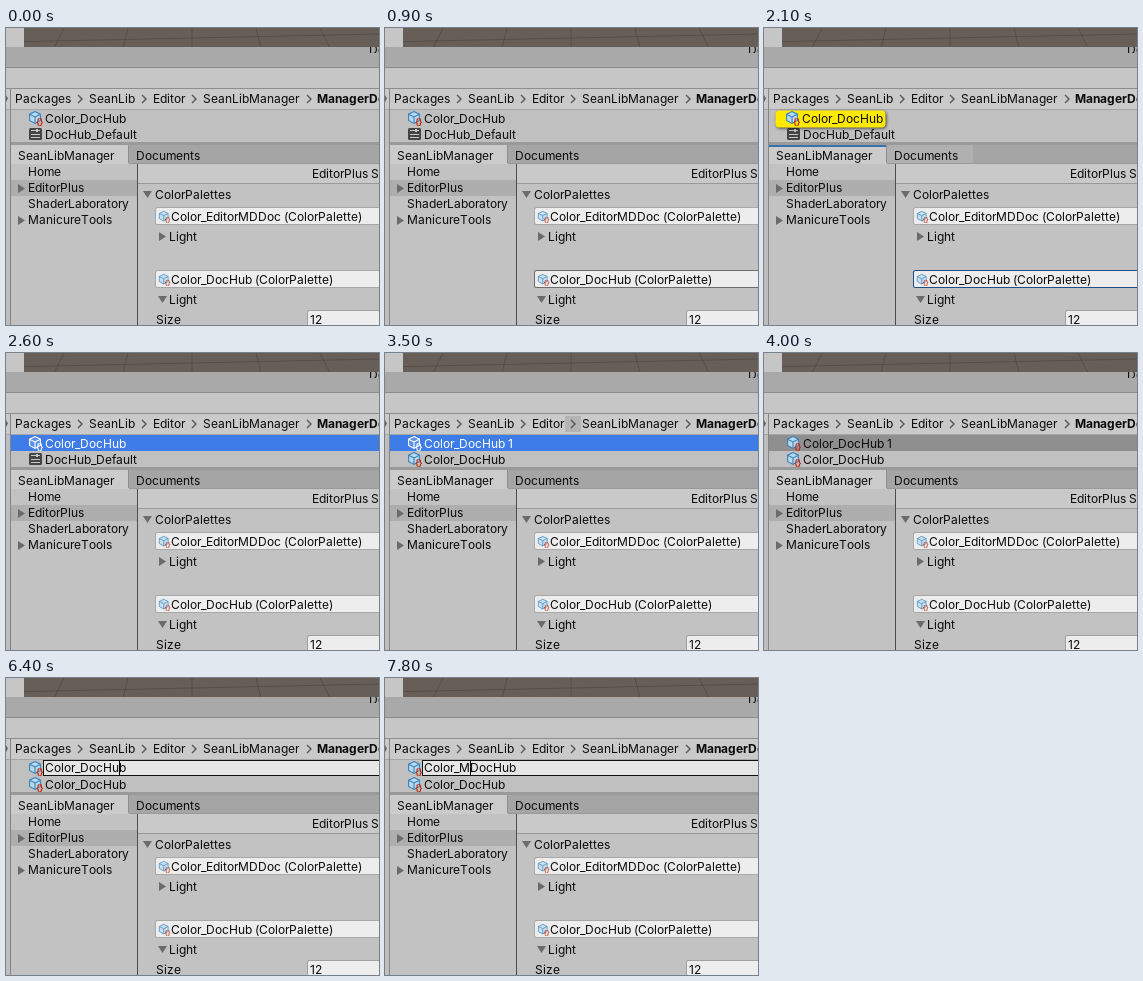
An HTML page with a canvas that plays this animation: 373x297 px, repeating every 8 s.

```html
<!DOCTYPE html>
<html lang="en">
<head>
<meta charset="utf-8">
<title>Duplicating a palette asset</title>
<style>
html, body { margin: 0; width: 373px; height: 297px; overflow: hidden; background: #c2c2c2; }
canvas { display: block; }
</style>
</head>
<body>
<canvas id="stage" width="373" height="297"></canvas>
<script>
const W = 373, H = 297, LOOP = 8000;
const ctx = document.getElementById('stage').getContext('2d');
const INK = '#0b0b0b', BLUE = '#3e7de7', PANEL = '#c2c2c2';

function rect(x, y, w, h, color) {
  ctx.fillStyle = color;
  ctx.fillRect(x, y, w, h);
}

function roundBox(x, y, w, h, r, color) {
  ctx.beginPath();
  ctx.roundRect(x, y, w, h, r);
  ctx.fillStyle = color;
  ctx.fill();
}

function setFont(weight) {
  ctx.font = weight + ' 12px Inter, Roboto, sans-serif';
}

// The editor lays glyphs out on whole pixels, halves going down.
const advance = ch => Math.round(ctx.measureText(ch).width - 0.06);

function widthOf(str) {
  setFont(400);
  return [...str].reduce((sum, ch) => sum + advance(ch), 0);
}

function text(str, x, y, color = INK, weight = 400) {
  setFont(weight);
  ctx.fillStyle = color;
  for (const ch of str) {
    ctx.fillText(ch, x, y);
    x += advance(ch);
  }
}

function path(points, close) {
  ctx.beginPath();
  points.forEach(([x, y], i) => i ? ctx.lineTo(x, y) : ctx.moveTo(x, y));
  if (close) ctx.closePath();
}

function arrow(x, y, open) {
  path(open ? [[x, y], [x + 9, y], [x + 4.5, y + 7]] : [[x, y], [x + 7, y + 4.5], [x, y + 9]], true);
  ctx.fillStyle = '#6b6b6b';
  ctx.fill();
}

// Cube with braces; (x, y) is the top left of a 16 px cell.
function cube(x, y, size = 1, white = false) {
  ctx.save();
  ctx.translate(x, y);
  ctx.scale(size, size);
  path([[7, 1.6], [12.4, 4.2], [12.4, 10.4], [7, 13.4], [1.6, 10.4], [1.6, 4.2]], true);
  ctx.fillStyle = white ? 'rgba(255,255,255,.15)' : '#b9d9ee';
  ctx.fill();
  ctx.lineWidth = 1.1;
  ctx.strokeStyle = white ? '#fff' : '#3a83bb';
  ctx.stroke();
  path([[1.6, 4.2], [7, 7], [12.4, 4.2]]);
  ctx.stroke();
  path([[7, 7], [7, 13.4]]);
  ctx.stroke();
  ctx.font = 'bold 8.5px Inter, Roboto, sans-serif';
  ctx.fillStyle = white ? '#fff' : '#c5290f';
  ctx.fillText('{', 8, 14.6);
  ctx.fillText('}', 11.6, 14.6);
  ctx.restore();
}

function presetIcon(x, y, white) {
  const dark = white ? '#fff' : '#444', light = white ? BLUE : '#c8c8c8';
  roundBox(x + 1, y + 2, 13, 12, 1.5, dark);
  for (const row of [4, 8, 11]) rect(x + 3, y + row, 9, 1, light);
  rect(x + 8, y + 3, 2, 3, light);
}

function chevron(x, y) {
  path([[x, y], [x + 4, y + 4], [x, y + 8]]);
  ctx.strokeStyle = '#555';
  ctx.lineWidth = 1.4;
  ctx.stroke();
}

function sceneStrip() {
  ctx.save();
  ctx.beginPath();
  ctx.rect(0, 0, W, 19);
  ctx.clip();
  rect(0, 0, W, 19, '#685e58');
  ctx.strokeStyle = 'rgba(45,40,38,.3)';
  ctx.lineWidth = 1;
  for (let i = -3; i < 4; i++) {
    const x = 186 + i * 64;
    path([[x, 0], [x + i * 5, 20]]);
    ctx.stroke();
  }
  path([[0, 14], [W, 6]]);
  ctx.stroke();
  rect(0, 0, 18, 19, '#c6c6c6');
  ctx.restore();
}

function topBars() {
  rect(0, 19, W, 20, '#a9a9a9');
  ctx.save();
  ctx.beginPath();
  ctx.rect(0, 19, W, 6);
  ctx.clip();
  text('Do', 363, 26);
  ctx.restore();
  rect(0, 39, W, 1, '#8c8c8c');
  rect(0, 40, W, 20, '#c6c6c6');
  rect(0, 60, W, 1, '#8e8e8e');
}

function crumbs(hover) {
  rect(5, 61, W, 20, '#cacaca');
  rect(5, 81, W, 1, '#a6a6a6');
  if (hover) rect(180, 63, 16, 16, '#b4b4b4');
  text('Packages', 9, 75);
  text('SeanLib', 83, 75);
  text('Editor', 147, 75);
  text('SeanLibManager', 197, 75);
  text('ManagerDoc', 311, 75, INK, 700);
  for (const x of [72, 136, 186, 301]) chevron(x, 67);
}

function assetRow(y, name, preset, fill) {
  const white = fill === BLUE;
  rect(5, y, W, 16, fill || '#c0c0c0');
  if (preset) presetIcon(22, y, white);
  else cube(22, y, 1, white);
  text(name, 39, y + 13, white ? '#fff' : INK);
}

function renameBox(s) {
  assetRow(82, '', false);
  rect(37, 82, W, 16, '#111');
  rect(38, 83, W, 14, '#e6e6e6');
  if (s.all) rect(39, 83, widthOf(s.name), 14, '#73a3e2');
  text(s.name, 39, 94);
  if (!s.all) rect(39 + widthOf(s.name.slice(0, s.caret)), 83, 1, 14, '#000');
}

function assets(t) {
  const copied = t >= 3500;
  const first = copied ? 'Color_DocHub 1' : 'Color_DocHub';
  const second = copied ? 'Color_DocHub' : 'DocHub_Default';
  const fill = t < 2600 ? null : t < 4000 ? BLUE : '#8f8f8f';
  assetRow(98, second, !copied, t >= 2200 && t < 2600 ? BLUE : null);
  if (t < 5000) assetRow(82, first, false, fill);
  else renameBox(renameState(t));
}

function renameState(t) {
  const name = t < 5900 ? 'Color_DocHub 1' : t < 6100 ? 'Color_DocHub ' : t < 7800 ? 'Color_DocHub' : 'Color_MDocHub';
  const moves = [6400, 6500, 6600, 6800, 6900, 7100].filter(at => t >= at).length;
  return { name, all: t < 5700, caret: name.length - moves };
}

function tabs(active, hover) {
  rect(5, 114, W, 3, '#9a9a9a');
  rect(5, 117, W, 18, '#a5a5a5');
  if (hover) rect(123, 117, 86, 18, '#b0b0b0');
  rect(5, 117, 117, 19, '#cbcbcb');
  if (active) rect(5, 117, 117, 2, '#3a72b0');
  rect(122, 117, 1, 18, '#8f8f8f');
  rect(123, 135, W, 1, '#999');
  text('SeanLibManager', 12, 132);
  text('Documents', 130, 132);
}

function tree() {
  rect(5, 136, 126, H, PANEL);
  rect(5, 152, 126, 16, '#aeaeae');
  ['Home', 'EditorPlus', 'ShaderLaboratory', 'ManicureTools'].forEach((name, i) => text(name, 22, 148 + i * 16));
  arrow(12, 156);
  arrow(12, 188);
  rect(131, 136, 1, H, '#4d4d4d');
}

function field(y, name, border) {
  roundBox(149, y, W, 18, 2.5, border || '#a8a8a8');
  roundBox(150, y + 1, W, 16, 1.5, '#ededed');
  ctx.globalAlpha = .75;
  cube(152, y + 3, .82);
  ctx.globalAlpha = 1;
  text(name + ' (ColorPalette)', 165, y + 14);
}

function inspector(t) {
  const hover = '#6c6c6c';
  rect(132, 136, W, H, PANEL);
  rect(132, 136, W, 19, '#c9c9c9');
  rect(132, 155, W, 1, '#999');
  text('EditorPlus Settings', 306, 150);
  arrow(137, 163, true);
  text('ColorPalettes', 149, 171);
  const overFirst = t >= 400 && t < 800 || t >= 1600 && t < 1700;
  field(179, 'Color_EditorMDDoc', overFirst && hover);
  arrow(153, 204);
  text('Light', 163, 213);
  const focused = t >= 1200 && t < 2200;
  field(242, 'Color_DocHub', focused ? '#1d5087' : t >= 900 && t < 1200 && hover);
  arrow(152, 268, true);
  text('Light', 163, 276);
  text('Size', 150, 296);
  roundBox(301, 282, W, H, 2.5, '#a0a0a0');
  roundBox(302, 283, W, H, 1.5, '#ededed');
  text('12', 304, 296);
}

function ping(t) {
  if (t < 1200 || t >= 2200) return;
  const grow = t < 1300 ? 1.08 : t < 1400 ? 1.65 : 1;
  ctx.save();
  ctx.translate(66.5 - (grow - 1) * 10, 91 + (grow - 1));
  ctx.scale(grow, grow);
  ctx.translate(-66.5, -91);
  ctx.shadowColor = 'rgba(0,0,0,.65)';
  ctx.shadowBlur = 3;
  ctx.shadowOffsetX = 1;
  ctx.shadowOffsetY = 1;
  roundBox(11.5, 82.5, 110, 17, 4, '#ffea00');
  ctx.shadowColor = 'transparent';
  cube(21, 82);
  text('Color_DocHub', 38, 95);
  ctx.restore();
}

function draw(t) {
  ctx.fontKerning = 'none';
  rect(0, 0, W, H, PANEL);
  sceneStrip();
  topBars();
  rect(0, 61, 4, H, '#bebebe');
  rect(0, 61, 4, 20, '#cacaca');
  rect(0, 81, 4, 1, '#a6a6a6');
  path([[0, 67], [2, 70.5], [0, 74]], true);
  ctx.fillStyle = '#666';
  ctx.fill();
  crumbs(t >= 3400 && t < 3600 || t >= 4500 && t < 4700);
  assets(t);
  tabs(t >= 1200 && t < 2200, t >= 2100 && t < 2200);
  tree();
  inspector(t);
  rect(4, 61, 1, H, '#858585');
  ping(t);
}

const start = performance.now();
function tick() {
  draw((performance.now() - start) % LOOP);
  requestAnimationFrame(tick);
}
tick();
</script>
</body>
</html>
```
